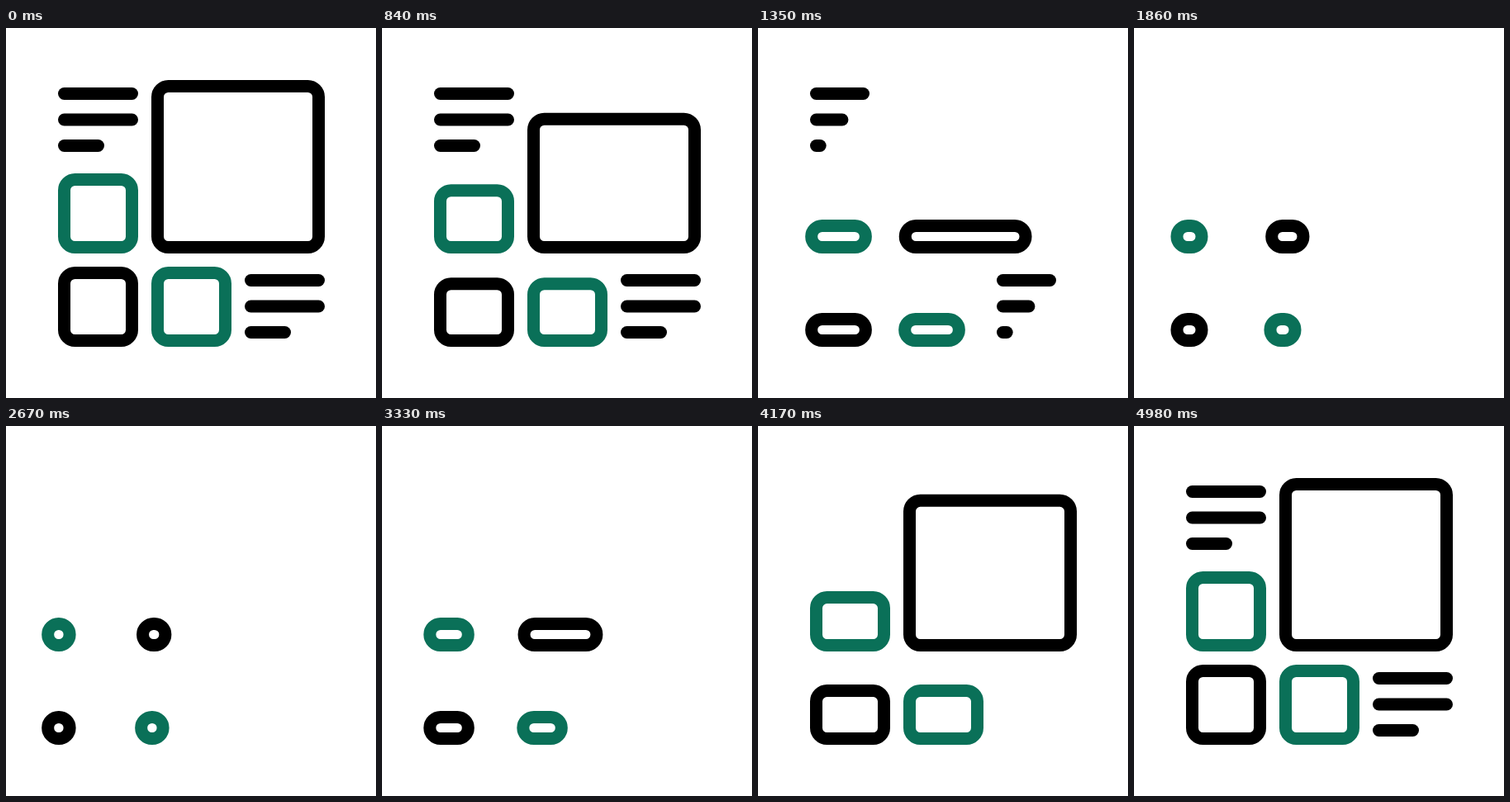
An HTML page with a canvas for the animation above (5.4 s loop, 448 px wide and 448 px high).

```html
<!DOCTYPE html>
<html lang="en">
<head>
<meta charset="utf-8">
<title>Layout blocks</title>
<style>
  html, body { margin: 0; width: 100%; height: 100%; overflow: hidden; background: #fff; }
  canvas { display: block; width: 100vmin; height: 100vmin; }
</style>
</head>
<body>
<canvas width="448" height="448"></canvas>
<script>
const LOOP = 5400, STROKE = 15, RADIUS = 13, MIN_SIZE = 41;
const BLACK = '#000', GREEN = '#0a7058';
const ctx = document.querySelector('canvas').getContext('2d');

// left, bottom and size of the outer edge; shift = travel to the left when narrow
const boxes = [
  { left: 63, bottom: 273, size: 97, shift: 20, color: GREEN },
  { left: 63, bottom: 386, size: 97, shift: 20, color: BLACK },
  { left: 176, bottom: 386, size: 97, shift: 20, color: GREEN },
  { left: 176, bottom: 273, size: 210, shift: 18.1, color: BLACK, quick: true },
];
const textBlocks = [[70.5, 79.5], [296.5, 305.5]];
const lineLengths = [82, 82, 41];

const span = (t, start, end) => Math.min(1, Math.max(0, (t - start) / (end - start)));
const easeIn = (u, power) => u ** power;
const easeOut = (u, power) => 1 - (1 - u) ** power;
const smooth = u => u * u * (3 - 2 * u);
const mix = (a, b, p) => a + (b - a) * p;

function drawBox({ left, bottom, size, shift, color, quick }, t) {
  const rise = span(t, 3670, 4980);
  const flat = easeIn(span(t, 60, 1241), 3.5) - easeOut(rise, quick ? 5.4 - 2.5 * rise : 1.75);
  const narrow = easeOut(span(t, 1241, 2416), 3.5) - easeIn(span(t, 2416, 3695), 3);
  const width = mix(size, MIN_SIZE, narrow);
  const height = mix(size, MIN_SIZE, flat);
  ctx.strokeStyle = color;
  ctx.beginPath();
  ctx.roundRect(left - shift * narrow + STROKE / 2, bottom - height + STROKE / 2,
    width - STROKE, height - STROKE, RADIUS);
  ctx.stroke();
}

function drawLine(x, y, row, t) {
  const hideAt = 1131 - 127 * row, showAt = 4200 + 120 * row;
  const shown = 1 - smooth(span(t, hideAt, hideAt + 600)) + smooth(span(t, showAt, showAt + 520));
  if (shown < 0.001) return;
  ctx.strokeStyle = BLACK;
  ctx.beginPath();
  ctx.moveTo(x, y);
  ctx.lineTo(x + lineLengths[row] * shown, y);
  ctx.stroke();
}

function render(now) {
  const t = now % LOOP;
  ctx.fillStyle = '#fff';
  ctx.fillRect(0, 0, 448, 448);
  ctx.lineWidth = STROKE;
  ctx.lineCap = 'round';
  boxes.forEach(box => drawBox(box, t));
  for (const [x, y] of textBlocks)
    for (let row = 0; row < 3; row++) drawLine(x, y + 31.5 * row, row, t);
  requestAnimationFrame(render);
}
requestAnimationFrame(render);
</script>
</body>
</html>
```
